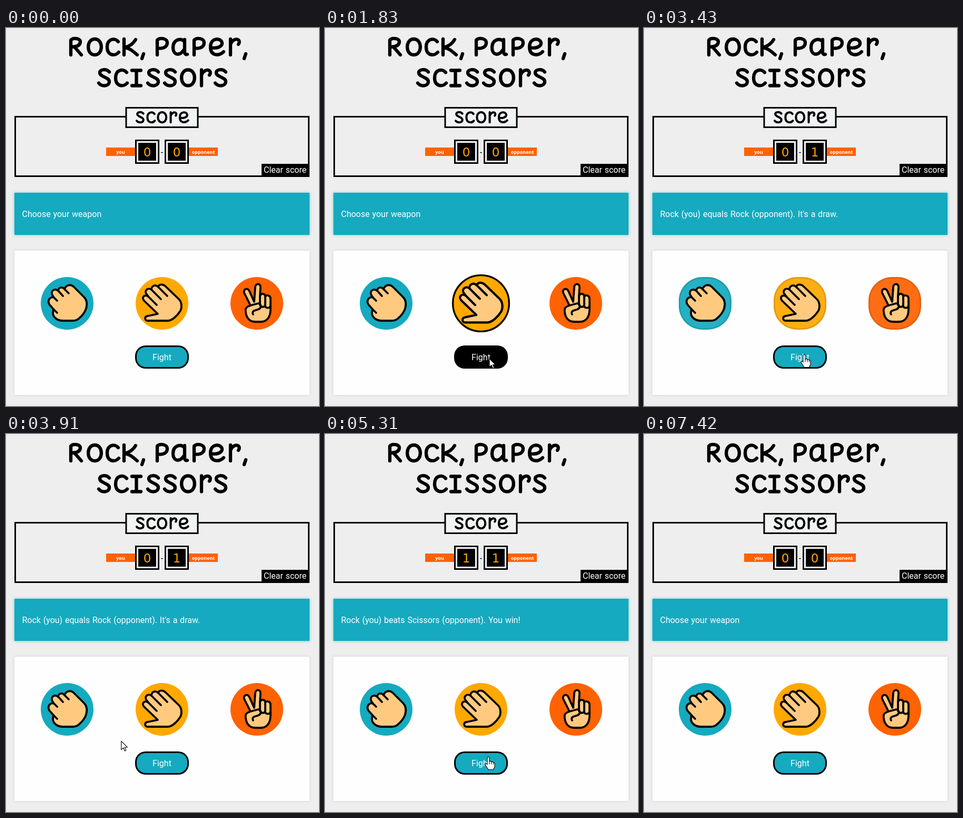
These frames come from a looping animation (594x718 px, 8760 ms). An HTML page with a canvas:

```html
<!DOCTYPE html>
<html lang="en">
<head>
<meta charset="utf-8">
<title>Rock, Paper, Scissors</title>
<style>
  html, body { margin: 0; width: 100%; height: 100%; overflow: hidden; background: #eee; }
  canvas { display: block; width: 594px; height: 718px; }
</style>
</head>
<body>
<canvas id="stage" width="594" height="718" role="img" aria-label="Rock, Paper, Scissors. Score.">Rock, Paper, Scissors</canvas>
<script>
const ctx = document.getElementById('stage').getContext('2d');
const LOOP = 8760, SETTLE_STEP = 70;
const TEAL = '#15aabf', AMBER = '#ffa800', ORANGE = '#ff6200', SKIN = '#ffca80';
const BODY = 'Roboto, sans-serif', DIGITS = '"DejaVu Sans", sans-serif', LABEL = '"Noto Sans", sans-serif';

// Hand-lettered glyphs as pen strokes, 37 units tall: advance, path
const GLYPHS = {
  R: [34, 'M4 34V6C8 1 23 2 22 10C21 18 12 19 5 19M11 19L24 34'],
  o: [36, 'M15.5 4C-1 4-1 34 15.5 34C32 34 32 4 15.5 4Z'],
  c: [31, 'M24 9C18 1 3 3 3 19C3 36 18 37 25 29'],
  k: [35, 'M4 4V34M26 5C21 14 14 18 5 20C14 21 20 26 29 34'],
  ',': [12, 'M6 32L3 41'],
  ' ': [15, ''],
  P: [32, 'M5 34V6C10 1 24 2 24 11C24 20 14 23 6 21'],
  a: [38, 'M24 8C16 1 3 6 3 20C3 34 15 38 24 24M25 5V28C25 33 28 34 30 33'],
  e: [37, 'M5 20C16 23 27 18 26 11C24 1 4 1 4 19C4 36 20 37 29 28'],
  r: [28, 'M5 4V34M5 14C8 6 15 3 19 5C23 7 22 12 20 14'],
  s: [32, 'M23 8C17 1 4 3 5 10C6 18 24 18 23 27C22 36 8 36 3 29'],
  i: [30, 'M3 5H20M11.5 5V34M3 34H20']
};

const WEAPONS = [
  { x: 116, rgb: [21, 170, 191],
    shape: 'M-26 11L-33 3C-39-5-32-14-25-11L-27-14C-33-22-25-30-17-24C-16-31-9-32-5-27C-2-35 6-37 12-32L32-12C39-5 38 3 36 10C33 19 28 24 22 29C18 33 14 33 10 33H-8C-18 33-27 27-27 18Z',
    lines: 'M-25-11L-19-5M-17-24L-8-14M-5-27L3-19M-26 11L-19 18' },
  { x: 296, rgb: [255, 168, 0],
    shape: 'M-8 20L-34-5C-40-12-32-18-26-13L-29-17C-35-24-26-31-20-26C-20-33-13-37-7-31C-6-37 2-37 7-32L32-8C38-2 38 8 35 14C30 22 20 33 11 33H-27C-33 33-34 25-27 24Z',
    lines: 'M-26-13L-10 3M-20-26L-2-8M-7-31L10-14' },
  { x: 476, rgb: [255, 98, 0],
    shape: 'M-12 4L-24-20C-26-27-17-31-14-23L-5-3L-3-31C-2-39 8-38 7-30L6-14C8-20 16-19 16-13C19-17 26-15 26-9V12C26 27 18 35 8 35H-3C-14 35-20 27-21 17C-22 10-21 7-12 4Z',
    lines: 'M6-14V2M16-13V3C15 8 8 8 6 3M16 5C17 10 25 10 26 4M-12 4L3 0C9 2 9 8 4 11L-5 14C-9 16-8 20-7 21' }
].map(w => ({ ...w, shape: new Path2D(w.shape), lines: new Path2D(w.lines) }));

const ARROW = new Path2D('M0 0V16L4 12.5L6.5 18.5L9 17.5L6.5 11.5H11.5Z');
const HAND = new Path2D('M-2 1C-2-1 2-1 2 1V8C3 7 6 7 6 9C7 8 9 8.5 9.5 10C11 9.5 12 10 12 12V17C12 20 10 21 9.5 23.5H0C-1 21-5 16-6 14C-6 12-4 11.5-2 14Z');
const KNUCKLES = new Path2D('M2 8V13M6 9V13M9.5 10V13');

// Each round: a weapon is clicked and the fight ends at `at`;
// the circles then settle back from plain buttons in `steps`.
const ROUNDS = [
  { at: 0, steps: 0, status: 'Choose your weapon', score: [0, 0] },
  { at: 1910, steps: 2, weapon: 1, click: 830, score: [0, 1],
    status: 'Paper (you) loses to Scissors (opponent). You lost...' },
  { at: 3430, steps: 1, weapon: 0, click: 2680, score: [0, 1],
    status: "Rock (you) equals Rock (opponent). It's a draw." },
  { at: 5090, steps: 3, weapon: 0, click: 4540, score: [1, 1],
    status: 'Rock (you) beats Scissors (opponent). You win!' },
  { at: 6830, steps: 3, status: 'Choose your weapon', score: [0, 0] }
];

// Pointer moves: leave, arrive, x, y
const MOVES = [
  [350, 350, 228, 701], [350, 750, 300, 545], [910, 1190, 328, 587],
  [1260, 1500, 312, 628], [2070, 2600, 136.5, 539], [2760, 3050, 304, 621],
  [3680, 4150, 129, 544], [4540, 4850, 310, 614], [5710, 6570, 510, 264],
  [7180, 7420, 520, 465]
];

const smooth = f => f * f * (3 - 2 * f);

function pointer(t) {
  if (t < 350 || t >= 7420) return null;
  const i = MOVES.findLastIndex(m => m[0] <= t);
  const [leave, arrive, x, y] = MOVES[i];
  const [, , x0, y0] = MOVES[i - 1];
  const f = smooth(Math.min(1, (t - leave) / (arrive - leave)));
  return { x: x0 + (x - x0) * f, y: y0 + (y - y0) * f, leave };
}

const inBox = (p, x, y, w, h) => p && p.x >= x && p.x < x + w && p.y >= y && p.y < y + h;

function rect(x, y, w, h, color) {
  ctx.fillStyle = color;
  ctx.fillRect(x, y, w, h);
}

function text(str, x, y, font, color, align = 'left') {
  ctx.font = font;
  ctx.wordSpacing = '0.8px';
  ctx.textAlign = align;
  ctx.fillStyle = color;
  ctx.fillText(str, x, y);
}

function lettering(str, x, y, scale) {
  ctx.save();
  ctx.translate(x, y);
  ctx.scale(scale, scale);
  ctx.strokeStyle = '#000';
  ctx.lineWidth = 6.3;
  for (const ch of str) {
    const [advance, path] = GLYPHS[ch];
    ctx.stroke(new Path2D(path));
    ctx.translate(advance, 0);
  }
  ctx.restore();
}

function panel(y, h, color, glow) {
  ctx.save();
  ctx.shadowColor = glow;
  ctx.shadowBlur = 5;
  rect(16, y, 560, h, color);
  ctx.restore();
}

function scoreSide(label, labelX, boxX, n) {
  rect(labelX, 227, 55, 16, ORANGE);
  text(label, labelX + 27.5, 239, `bold 9px ${LABEL}`, '#fff', 'center');
  rect(boxX, 212, 46, 46, '#000');
  rect(boxX + 3, 215, 40, 40, '#fff');
  rect(boxX + 6, 218, 34, 34, '#000');
  text(n, boxX + 23, 244, `23px ${DIGITS}`, AMBER, 'center');
}

function roundBox(x, y, w, h, r, fill) {
  ctx.beginPath();
  ctx.roundRect(x, y, w, h, r);
  ctx.fillStyle = fill;
  ctx.fill();
}

function weapon(w, picked, settle) {
  ctx.save();
  ctx.translate(w.x, 523);
  if (picked) ctx.scale(1.1, 1.1);
  const fill = w.rgb.map(c => Math.round(c + (239 - c) * settle * 0.08));
  const r = 50 - 5 * settle;
  roundBox(-50, -50, 100, 100, r, `rgb(${fill})`);
  if (picked || settle) {
    ctx.beginPath();
    ctx.roundRect(-48.5, -48.5, 97, 97, r - 1.5);
    ctx.strokeStyle = picked ? '#000' : `rgba(0,0,0,${0.1 * settle})`;
    ctx.lineWidth = 3;
    ctx.stroke();
  }
  ctx.fillStyle = SKIN;
  ctx.fill(w.shape);
  ctx.strokeStyle = '#000';
  ctx.lineWidth = 3.8;
  ctx.stroke(w.shape);
  ctx.stroke(w.lines);
  ctx.restore();
}

function drawPointer(p, isHand, clicked) {
  if (clicked) {
    ctx.beginPath();
    ctx.arc(p.x, p.y, 13, 0, 7);
    ctx.fillStyle = 'rgba(245,228,40,.78)';
    ctx.fill();
  }
  ctx.save();
  ctx.translate(p.x, p.y);
  const shape = isHand ? HAND : ARROW;
  ctx.fillStyle = '#fff';
  ctx.fill(shape);
  ctx.strokeStyle = '#000';
  ctx.lineWidth = 1.1;
  ctx.stroke(shape);
  if (isHand) ctx.stroke(KNUCKLES);
  ctx.restore();
}

function draw(t) {
  const now = ROUNDS.findLastIndex(r => r.at <= t);
  const { at, steps, status, score } = ROUNDS[now];
  const next = ROUNDS[now + 1] || {};
  const settle = Math.max(0, steps - Math.floor((t - at) / SETTLE_STEP));
  const clicked = t >= next.click && t < next.click + 80;
  const picked = t >= next.click + 80 ? next.weapon : -1;

  const p = pointer(t);
  const onFight = inBox(p, 245, 603, 102, 44);
  // Hover only counts once the pointer has moved since the last result
  const hover = onFight && p.leave >= at;
  const onWeapon = p && WEAPONS.some(w => Math.hypot(p.x - w.x, p.y - 523) < 50);
  const isHand = onWeapon || (onFight && !hover) || inBox(p, 485, 258, 91, 25);

  ctx.lineCap = ctx.lineJoin = 'round';
  rect(0, 0, 594, 718, '#eee');
  lettering('Rock, PaPer,', 119, 17, 1);
  lettering('scissors', 173, 75.5, 1);

  rect(16, 167, 560, 116, '#000');
  rect(19, 170, 554, 110, '#eee');
  rect(226.5, 150, 139, 40, '#000');
  rect(229.5, 153, 133, 34, '#f0f4f4');
  lettering('score', 246, 157.5, 0.64);

  scoreSide('you', 190, 245, score[0]);
  scoreSide('opponent', 347, 301, score[1]);
  text('-', 296, 242, `16px ${BODY}`, '#000', 'center');
  rect(485, 258, 91, 25, '#000');
  text('Clear score', 489, 275, `16px ${BODY}`, '#fff');

  panel(313, 80, TEAL, 'rgba(21,170,191,.6)');
  text(status, 30.5, 359, `16px ${BODY}`, '#fff');
  panel(423, 274, '#fefefe', 'rgba(0,0,0,.12)');

  WEAPONS.forEach((w, i) => weapon(w, picked === i, settle));

  roundBox(245, 603, 102, 44, 20, '#000');
  if (!hover) roundBox(248, 606, 96, 38, 17, TEAL);
  text('Fight', 296, 631, `16px ${BODY}`, '#fff', 'center');

  if (p) drawPointer(p, isHand, clicked);
}

const start = performance.now();
function tick() {
  draw((performance.now() - start) % LOOP);
  requestAnimationFrame(tick);
}
tick();
</script>
</body>
</html>
```
